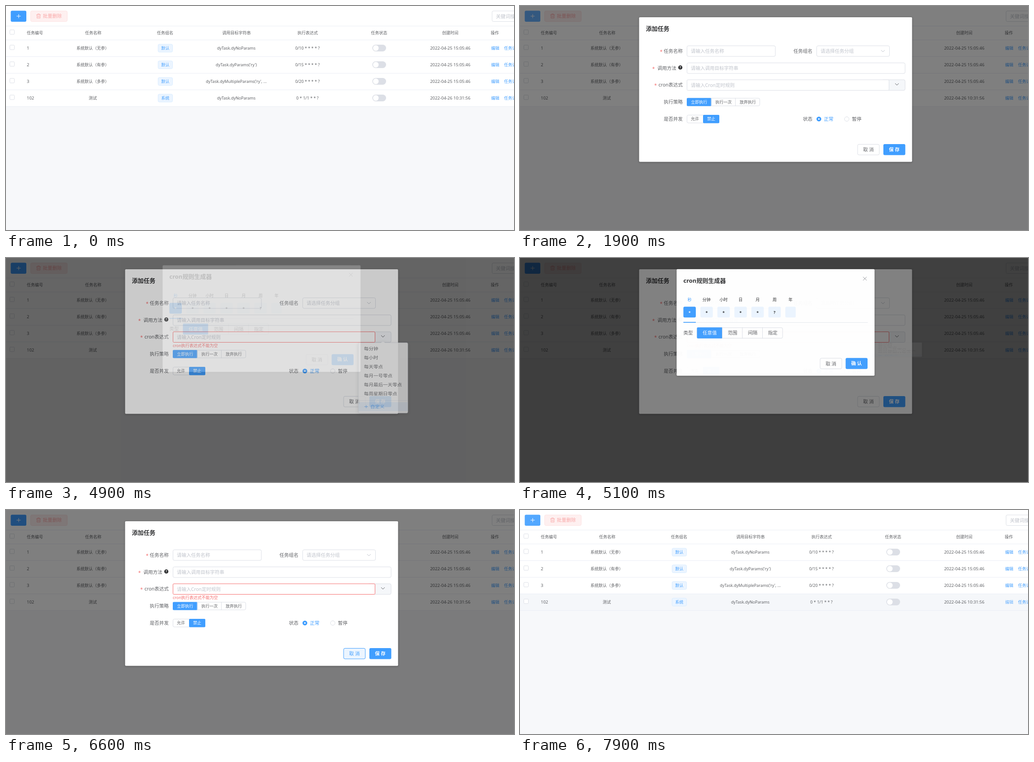
An HTML page for the animation above (8000 ms loop, 1124 px wide and 498 px high).

```html
<!DOCTYPE html>
<html>
<head>
<meta charset="utf-8">
<title>任务管理</title>
<style>
  html, body { margin: 0; width: 100%; height: 100%; overflow: hidden; background: #f7f8fa; }
  svg { display: block; fill: #606266; font: 9px "Noto Sans", "Noto Sans CJK SC", "Noto Sans CJK", sans-serif; }
  .form { font-size: 10.5px; }
  .title { font-size: 13px; font-weight: 600; fill: #303133; }
  .mid { text-anchor: middle; }
  .end { text-anchor: end; }
  .date { font-size: 9.45px; }
  .bold { font-weight: 600; }
  .panel { filter: drop-shadow(0 1px 2px rgba(0, 0, 0, .3)); }
  .menu { filter: drop-shadow(0 2px 5px rgba(0, 0, 0, .12)); }
  .cancel rect { fill: #fff; stroke: #dcdfe6; }
  .cancel.on rect { fill: #ecf5ff; stroke: #409eff; }
  .cancel.on text { fill: #409eff; }
  .item rect { fill: none; }
  .item.on rect { fill: #ecf5ff; }
  .item.on text { fill: #66b1ff; }
  .item.on path { stroke: #66b1ff; }
</style>
</head>
<body>
<svg id="stage" width="1124" height="498" viewBox="0 0 1124 498"></svg>
<script>
const BLUE = '#409eff', RED = '#f56c6c', BORDER = '#dcdfe6', LINE = '#ebeef5', HINT = '#c0c4cc';

// Drawing helpers; text is centred vertically on y
const text = (x, y, str, cls = '', fill = '') =>
  `<text x="${x}" y="${y}" dy=".36em" class="${cls}"${fill && ` fill="${fill}"`}>${str}</text>`;
const rect = (x, y, w, h, fill, stroke = 'none', r = 0, extra = '') =>
  `<rect x="${x}" y="${y}" width="${w}" height="${h}" rx="${r}" fill="${fill}" stroke="${stroke}" ${extra}/>`;
const path = (d, stroke, width = 1) => `<path d="${d}" fill="none" stroke="${stroke}" stroke-width="${width}"/>`;
const circle = (x, y, r, fill, stroke = 'none') => `<circle cx="${x}" cy="${y}" r="${r}" fill="${fill}" stroke="${stroke}"/>`;
const plus = (x, y, r, color) => path(`M${x - r} ${y}h${2 * r}M${x} ${y - r}v${2 * r}`, color);
const chevron = (x, y, color) => path(`M${x - 4} ${y - 2}l4 4l4 -4`, color);
const group = (id, body, cls = '') => `<g id="${id}" class="${cls}">${body}</g>`;

const input = (x, y, w, hint) => rect(x, y, w, 23.5, '#fff', BORDER, 3) + text(x + 8.5, y + 12, hint, 'form', HINT);
const label = (x, y, str, star) =>
  text(x, y, str, 'form end') + (star ? text(star, y + 1, '*', 'form mid', RED) : '');
const cancel = (id, x, y) =>
  group(id, rect(x, y, 48, 23.5, '#fff', BORDER, 3) + text(x + 24, y + 12, '取 消', 'form mid'), 'cancel');
const primary = (x, y, str) => rect(x, y, 48.5, 24.5, BLUE, 'none', 3) + text(x + 24, y + 12, str, 'form mid bold', '#fff');

// Segmented radio buttons; edges holds the x of every boundary
function segments(edges, y, h, names, active, cls = '') {
  const left = edges[0], right = edges[edges.length - 1];
  return rect(left + .5, y + .5, right - left - 1, h - 1, '#fff', BORDER, 3) + names.map((name, i) => {
    const x = edges[i], w = edges[i + 1] - x, on = i === active;
    const back = on ? rect(x, y, w, h, BLUE, 'none', 2) : i ? path(`M${x - .5} ${y}v${h}`, BORDER) : '';
    return back + text(x + w / 2, y + h / 2, name, cls + ' mid', on ? '#fff' : '');
  }).join('');
}

function page() {
  const box = y => rect(8.5, y - 5, 10, 10, '#fff', BORDER, 1.5);
  const heads = [[193, '任务名称'], [352, '任务组名'], [510, '调用目标字符串'], [667.5, '执行表达式'], [825.5, '任务状态'], [983, '创建时间']];
  const rows = [
    ['1', '系统默认（无参）', '默认', 'dyTask.dyNoParams', '0/10 * * * * ?', '2022-04-25 15:05:46'],
    ['2', '系统默认（有参）', '默认', "dyTask.dyParams('ry')", '0/15 * * * * ?', '2022-04-25 15:05:46'],
    ['3', '系统默认（多参）', '默认', "dyTask.dyMultipleParams('ry', ...", '0/20 * * * * ?', '2022-04-25 15:05:46'],
    ['102', '测试', '系统', 'dyTask.dyNoParams', '0 * 1/1 * * ?', '2022-04-26 10:31:56'],
  ];
  const row = ([id, name, tag, target, cron, date], i) => {
    const y = 94 + 37 * i;
    return box(y - 2) + text(46, y, id, 'date') + text(192, y, name, 'mid')
      + rect(336.5, y - 9, 32, 17.5, '#ecf5ff', '#d9ecff', 3) + text(352.5, y, tag, 'mid', BLUE)
      + text(509.5, y, target, 'mid') + text(667, y, cron, 'mid')
      + rect(810.5, y - 8, 30.5, 15, BORDER, 'none', 7.5) + circle(818.3, y - .5, 6.2, '#fff')
      + text(983, y, date, 'mid date')
      + `<g${i === 3 ? ' id="edit"' : ''} fill="${BLUE}">${text(1073.5, y - .5, '编辑')}</g>`
      + text(1102, y - .5, '任务详细', '', BLUE)
      + path(`M0 ${y + 18.5}h1124`, LINE);
  };
  return rect(0, 0, 1124, 498, '#f7f8fa') + rect(0, 0, 1124, 223, '#fff')
    + rect(0, 187, 1124, 36, '#f5f7fa', 'none', 0, 'id="rowHover"')
    + path('M0 44.5h1124M0 75.5h1124', LINE)
    + rect(10.5, 10.5, 34.5, 24.5, BLUE, 'none', 3, 'id="add"') + plus(28, 22.5, 4.5, '#fff')
    + rect(54.5, 11, 81, 23.5, '#fef0f0', '#fde2e2', 3)
    + path('M67 19.5h10M70 19v-1.5h4v1.5M68.5 20v7h7v-7M70.8 21.5v4M73.2 21.5v4', '#f9a7a7', .9)
    + text(81.5, 22.5, '批量删除', 'form', '#f9a7a7')
    + input(1075.5, 11, 150, '关键词搜索')
    + box(58) + text(46, 60, '任务编号') + heads.map(([x, s]) => text(x, 60, s, 'mid')).join('') + text(1072.5, 60, '操作')
    + rows.map(row).join('');
}

function taskForm() {
  return rect(263.5, 25, 604, 321.5, '#fff', 'none', 2, 'class="panel"') + text(278.5, 50, '添加任务', 'title')
    + label(360, 100, '任务名称', 312.5) + input(369.5, 88.5, 195.5, '请输入任务名称')
    + label(647, 100, '任务组名') + input(656.5, 88.5, 161, '请选择任务分组') + chevron(803, 100, HINT)
    + label(346, 138, '调用方法', 295.5) + circle(354.7, 136.7, 4.6, '#303133')
    + text(354.7, 136.7, '?', 'mid bold" font-size="7', '#fff').replace('class', 'style="font-size:7px" class')
    + input(369.5, 126.5, 482.5, '请输入调用目标字符串')
    + label(360, 175.5, 'cron表达式', 300)
    + rect(800.5, 164, 51.5, 23.5, '#f5f7fa', BORDER, 3) + chevron(834, 174, '#606266')
    + rect(369.5, 164, 447, 23.5, '#fff', BORDER, 2, 'id="cron"') + text(378, 176, '请输入Cron定时规则', 'form', HINT)
    + group('caret', path('M378.5 170v12', '#303133'))
    + group('error', text(369, 195, 'cron执行表达式不能为空', '', RED))
    + label(360, 213.5, '执行策略') + segments([369, 423.5, 477, 531], 204.5, 18, ['立即执行', '执行一次', '放弃执行'], 0)
    + label(360, 251.5, '是否并发') + segments([369, 405, 441], 242, 18.5, ['允许', '禁止'], 1)
    + label(647, 251.5, '状态') + circle(661.3, 251.3, 5.3, BLUE) + circle(661.3, 251.3, 1.7, '#fff')
    + text(672.5, 251.5, '正常', 'form', BLUE) + circle(723, 251.3, 5, '#fff', BORDER) + text(734.5, 251.5, '暂停', 'form')
    + cancel('formCancel', 747, 307.5) + primary(804, 307, '保 存');
}

function presets() {
  const names = ['每分钟', '每小时', '每天零点', '每月一号零点', '每月最后一天零点', '每周星期日零点'];
  const item = (y, body) => `<g class="item">${rect(780, y - 12, 108.5, 24, 'none')}${body}</g>`;
  return `<path class="menu" d="M782 188.5h47.5l4.5 -4.5l4.5 4.5h47.5q3 0 3 3v181.5q0 3 -3 3h-103.5q-3 0 -3 -3v-181.5q0 -3 3 -3z" fill="#fff" stroke="#e4e7ed"/>`
    + names.map((s, i) => item(204.7 + 24.1 * i, text(792, 204.7 + 24.1 * i, s, 'form'))).join('')
    + path('M780 342.5h109', LINE) + item(359, plus(797, 359, 4, '#606266') + text(806, 359.5, '自定义', 'form'));
}

function generator() {
  const fields = [['秒', '*'], ['分钟', '*'], ['小时', '*'], ['日', '*'], ['月', '*'], ['周', '?'], ['年', '']];
  const field = ([name, value], i) => {
    const x = 361.5 + 37.6 * i, w = i === 6 ? 23 : 27.5;
    return text(x + w / 2, 93, name, 'mid', i ? '#303133' : BLUE)
      + rect(x, 108.5, w, 24, i ? '#ecf5ff' : BLUE, 'none', 3)
      + text(x + w / 2, value === '*' ? 121.5 : 120.5, value, 'mid bold', i ? '#303133' : '#fff');
  };
  return rect(346.5, 25, 438, 237, '#fff', 'none', 2, 'class="panel"') + text(361.5, 50, 'cron规则生成器', 'title')
    + path('M759 42l8 8m0 -8l-8 8', '#909399') + fields.map(field).join('')
    + path('M361.5 143.5h408', '#e4e7ed') + rect(361.5, 142.3, 27.5, 1.7, BLUE)
    + text(361.5, 166.5, '类型', 'form')
    + segments([391.5, 448, 492.5, 537, 581.5], 154.5, 24.5, ['任意值', '范围', '间隔', '指定'], 0, 'form')
    + cancel('genCancel', 664, 223) + primary(720.5, 222.5, '确 认');
}

const overlay = (id, body) => group(id, rect(0, 0, 1124, 498, 'rgba(0,0,0,.5)') + group(id + 'Box', body));
const $ = id => document.getElementById(id);
$('stage').innerHTML = page() + overlay('form', taskForm()) + group('presets', presets()) + overlay('gen', generator());
const items = [...document.querySelectorAll('.item')];

const clamp = p => Math.min(1, Math.max(0, p));
const ease = (t, start, length = 300) => 1 - (1 - clamp((t - start) / length)) ** 2;
const show = (id, visible) => $(id).setAttribute('opacity', +visible);

// The overlay fades while its box fades within it and slides down from 15px above
function dialog(id, t, open, close) {
  const k = ease(t, open) * (1 - ease(t, close));
  show(id, k);
  show(id + 'Box', k);
  $(id + 'Box').setAttribute('transform', `translate(0 ${-15 * (1 - k)})`);
}

function draw(t) {
  $('add').setAttribute('fill', t >= 7900 ? '#53a8ff' : t >= 1300 && t < 2700 ? '#66b1ff' : BLUE);
  show('rowHover', t >= 6800);
  $('edit').setAttribute('fill', t >= 7500 ? '#66b1ff' : BLUE);

  dialog('form', t, 1545, 6600);
  $('cron').setAttribute('stroke', t >= 3500 ? RED : t >= 2800 ? BLUE : t >= 2700 ? HINT : BORDER);
  show('caret', t >= 2800 && t < 3300);
  show('error', ease(t, 3450));
  $('formCancel').classList.toggle('on', t >= 6400);

  const unfold = ease(t, 3720) * (1 - clamp((t - 4850) / 300));
  show('presets', unfold);
  $('presets').setAttribute('transform', `translate(0 ${188 * (1 - unfold)}) scale(1 ${unfold})`);
  const hovered = t >= 4600 ? 6 : t >= 4500 ? 4 : t >= 4400 ? 2 : -1;
  items.forEach((el, i) => el.classList.toggle('on', i === hovered));

  dialog('gen', t, 4830, 5750);
  $('genCancel').classList.toggle('on', t >= 5600);
}

function tick() {
  draw(Math.floor(performance.now() % 8000 / 100) * 100);
  requestAnimationFrame(tick);
}
tick();
</script>
</body>
</html>
```
